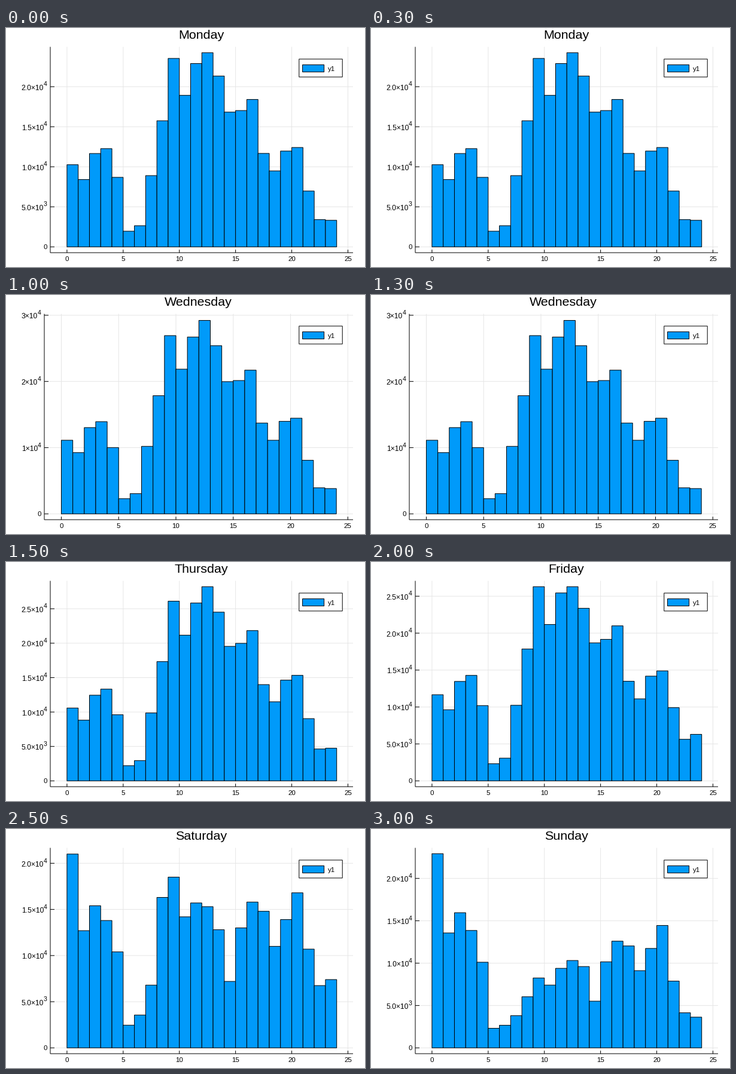
Animation of 600x400 px, one loop 3.5 s. Source, as a matplotlib script:

```python
import numpy as np
import matplotlib.pyplot as plt
from matplotlib.animation import FuncAnimation
from matplotlib.patches import Rectangle

WIDTH, HEIGHT, DPI = 600, 400, 100
PX = 72 / DPI                      # points per pixel
BLUE, GRID = "#009afa", "#e6e6e6"
BASE, PEAK_HEIGHT = 366.3, 325     # zero line and tallest bar, in pixels
PAD = 0.03 * PEAK_HEIGHT
TOP, BOTTOM, RIGHT = BASE - PEAK_HEIGHT - PAD, BASE + PAD, 580
X_MIN, X_SPAN = -1.486, 26.94      # hours at the left edge, hours across

# Typical daily rhythms, in hundreds per hour from midnight
WORKDAY = [108, 90, 127, 136, 98, 22.5, 30, 100, 175, 265, 216, 265,
           291, 254, 200, 202, 218, 138, 112, 141, 146, 84, 42, 42]
WEEKEND = [210, 127, 154, 138, 104, 24.6, 35.6, 68, 163, 185, 142, 157,
           153, 128, 72, 130, 158, 148, 110, 139, 168, 107, 67.5, 74]

# Each day bends a rhythm by gains given at a few hours
GAIN_HOURS = [0, 5, 8, 13, 20, 23]
FLAT = [1] * len(GAIN_HOURS)
WEEK = [  # name, tallest bar, rhythm, gains
    ("Monday", 24250, WORKDAY, [0.95, 0.87, 0.90, 0.84, 0.85, 0.79]),
    ("Tuesday", 29100, WORKDAY, FLAT),
    ("Wednesday", 29330, WORKDAY, [1.03, 1.02, 1.02, 1.00, 0.99, 0.91]),
    ("Thursday", 28210, WORKDAY, [0.98, 0.98, 0.99, 0.965, 1.05, 1.13]),
    ("Friday", 26290, WORKDAY, [1.08, 1.03, 1.02, 0.92, 1.02, 1.50]),
    ("Saturday", 21040, WEEKEND, FLAT),
    ("Sunday", 22920, WEEKEND, [1.10, 0.94, 0.37, 0.75, 0.86, 0.49]),
]

plt.rcParams["font.family"] = "Liberation Sans"
fig = plt.figure(figsize=(WIDTH / DPI, HEIGHT / DPI), dpi=DPI, facecolor="white")
ax = fig.add_axes([0, 0, 1, 1])


def hourly_counts(peak, rhythm, gains):
    gain = np.interp(range(24), GAIN_HOURS, gains)
    return np.minimum(100 * np.array(rhythm) * gain, peak)


def line(x0, y0, x1, y1, color="black", z=3):
    ax.plot([x0, x1], [y0, y1], color=color, lw=PX, zorder=z,
            solid_capstyle="butt", snap=False)


def box(x, y, w, h, fill, z):
    ax.add_patch(Rectangle((x, y), w, h, facecolor=fill, edgecolor="black",
                           lw=PX, zorder=z, joinstyle="miter", snap=False))


def text(x, y, s, size=11.5, ha="center"):
    ax.text(x, y, s, fontsize=size * PX, ha=ha, va="baseline", zorder=6)


def draw_x_axis(left, to_x):
    for hour in range(0, 26, 5):
        x = to_x(hour)
        line(x, TOP, x, BOTTOM, GRID, 1)
        line(x, BOTTOM, x, BOTTOM - 5)
        text(x, 390, str(hour))
    line(left, BOTTOM, RIGHT, BOTTOM)


def draw_y_axis(left, to_y, peak, step):
    for count in range(0, int(peak * 1.03) + 1, step):
        y = to_y(count)
        line(left, y, RIGHT, y, GRID, 1)
        line(left, y, left + 7, y)
        if count == 0:
            text(left - 5, y + 4, "0", ha="right")
            continue
        power = len(str(count)) - 1
        digits = 0 if step == 10000 else 1
        text(left - 11, y + 5.6, f"{count / 10 ** power:.{digits}f}×10", 12, "right")
        text(left - 5.8, y - 0.8, str(power), 10.5, "right")
    line(left, TOP, left, BOTTOM)


def draw_legend():
    box(489.8, 52, 72.4, 30, "white", 4)
    box(495.6, 61.6, 36, 12, BLUE, 5)
    text(537.6, 72, "y1", ha="left")


def draw(frame):
    ax.clear()
    ax.set(xlim=(0, WIDTH), ylim=(HEIGHT, 0))
    ax.axis("off")

    name, peak, rhythm, gains = WEEK[frame]
    step = 10000 if peak * 1.03 >= 30000 else 5000
    left = 64 if step == 10000 else 74     # shorter labels leave more room
    scale = (RIGHT - left) / X_SPAN

    def to_x(hour):
        return left + (hour - X_MIN) * scale

    def to_y(count):
        return BASE - PEAK_HEIGHT * count / peak

    draw_x_axis(left, to_x)
    draw_y_axis(left, to_y, peak, step)
    for hour, count in enumerate(hourly_counts(peak, rhythm, gains)):
        box(to_x(hour), to_y(count), scale, BASE - to_y(count), BLUE, 2)
    draw_legend()
    text((left + RIGHT) / 2 - 0.4, 18, name, 21.5)
    return []


anim = FuncAnimation(fig, draw, frames=len(WEEK), interval=500,
                     init_func=lambda: draw(0), repeat=True, repeat_delay=0)
plt.show()
```
